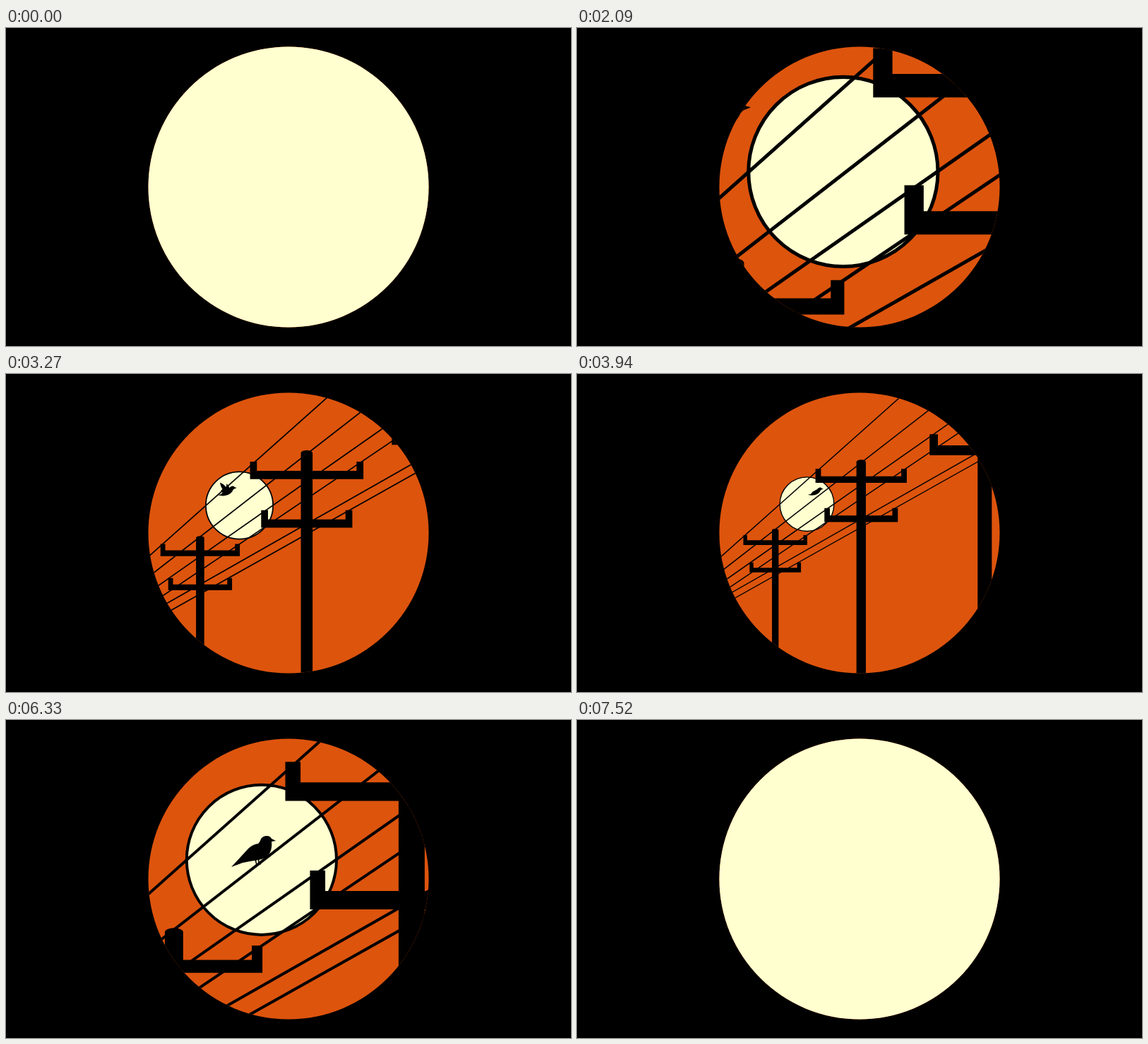
Write an HTML page with a canvas that moves like this. It is 800 by 450 pixels and loops after 7700 ms.

```html
<!DOCTYPE html>
<html lang="en">
<head>
<meta charset="utf-8">
<title>Bird on the wires</title>
<style>
  html, body { margin: 0; height: 100%; overflow: hidden; background: #000; }
  canvas { display: block; }
</style>
</head>
<body>
<canvas width="800" height="450"></canvas>
<script>
const ctx = document.querySelector('canvas').getContext('2d');
const LOOP = 7700, FOCUS = [305, 176.5];
const ORANGE = '#dd540d', CREAM = '#ffffcf';

// Scene units: screen pixels at zoom 1, measured from FOCUS.
const ZOOM = [[0, 1.9], [1850, 1.9], [2090, 1.281], [2760, .565], [3270, .244],
              [4210, 0], [5520, 0], [6330, 1.044], [7030, 1.9], [LOOP, 1.9]];
const FLY_X = [[1850, -34], [2090, -27.2], [2760, -8], [3270, 6.3], [4210, 36.3]];
const FLY_Y = [[1850, -17.5], [2090, -16.2], [2760, -13.5], [3270, -10.5], [4210, -12.3]];
const HOPS = [4520, 5000, 5520], HOP_TIME = 240;
const LEAVE = 6600, LEAVE_END = 7060, WIPE = 7080, WIPE_TIME = 230;

// Height at x = 0, slope, moment of appearing.
const WIRES = [[-7.8, -.89, 180], [23.9, -.776, 560], [47.4, -.7, 940],
               [63.8, -.674, 940], [81.7, -.568, 940], [92.4, -.561, 940]];

const clamp = v => Math.min(1, Math.max(0, v));
const smooth = v => v * v * (3 - 2 * v);

// Smooth curve through [time, value] keys, flat at turning points.
function track(keys, t) {
  const last = keys.length - 1;
  if (t <= keys[0][0]) return keys[0][1];
  if (t >= keys[last][0]) return keys[last][1];
  const i = keys.findIndex(k => k[0] > t) - 1;
  const rise = j => keys[j + 1][1] - keys[j][1];
  const slope = j => j < 1 || j >= last || rise(j - 1) * rise(j) <= 0 ? 0
    : (keys[j + 1][1] - keys[j - 1][1]) / (keys[j + 1][0] - keys[j - 1][0]);
  const span = keys[i + 1][0] - keys[i][0], u = (t - keys[i][0]) / span, v = 1 - u;
  return keys[i][1] + rise(i) * smooth(u)
    + span * u * v * (slope(i) * v - slope(i + 1) * u);
}

function disc(x, y, r, color) {
  ctx.fillStyle = color;
  ctx.beginPath();
  ctx.arc(x, y, r, 0, 7);
  ctx.fill();
}

function drawWires(t) {
  const out = clamp((t - WIPE) / WIPE_TIME);
  for (const [height, slope, start] of WIRES) {
    const grown = clamp((t - start) / 250);
    if (!grown || out === 1) continue;
    const from = out ? -16 + 60 * out : -120;
    const to = grown < 1 ? -16 + 60 * grown : 320;
    ctx.beginPath();
    ctx.moveTo(from, height + slope * from);
    ctx.lineTo(to, height + slope * to);
    ctx.stroke();
  }
}

function drawPole(x, top, scale) {
  ctx.save();
  ctx.translate(x, top);
  ctx.scale(scale, scale);
  ctx.beginPath();
  ctx.ellipse(0, 3, 6.5, 3, 0, 0, 7);
  ctx.rect(-6.5, 3, 13, 500);
  for (const [half, y] of [[62.9, 22.7], [50.6, 76.7]]) {
    ctx.rect(-half, y, 2 * half, 9.2);
    for (const side of [-half, half - 7.6]) ctx.rect(side, y - 10.2, 7.6, 12);
  }
  ctx.fill();
  ctx.restore();
}

const perched = new Path2D(`M-36 5Q-22-10-12-21Q-6-27 2-28Q5-31 6-35Q9-39 14-39
  Q19-39 21-35L27-32L21-31Q22-21 18-14Q12-6 2-5Q-10-3-20-1Z
  M-3-6h2l1 6h3v1.5h-4zM2-6h1.5l0 6h2.5v1.5h-4z`);
const body = new Path2D('M19-3L15-4Q13-7 9-6Q6-5 4-2L-7 4L-12 10L-19 11Q-10 14-2 12Q8 10 12 1L14-1Z');
const wings = new Path2D('M7 0Q2-2-1-3Q-7-11-14-13Q-12-4-9 0Q-13 3-12 5Q-6 8 0 7ZM6 1Q4-7-1-11Q-2-4-2 3Z');

function drawShape(x, y, scale, draw) {
  ctx.save();
  ctx.translate(x, y);
  ctx.scale(scale, scale);
  draw();
  ctx.restore();
}

function drawFlying(x, y, t) {
  drawShape(x, y, 1 / 1.76, () => {
    ctx.fill(body);
    ctx.translate(0, 3);
    ctx.scale(1, .4 + .6 * Math.cos((t - 2760) / 255 * 2 * Math.PI));
    ctx.translate(0, -3);
    ctx.fill(wings);
  });
}

function drawBird(t) {
  if (t < 1850 || t > LEAVE_END) return;
  if (t < 4210) return drawFlying(track(FLY_X, t), track(FLY_Y, t), t);
  if (t > LEAVE) {
    const u = (t - LEAVE) / (LEAVE_END - LEAVE);
    return drawFlying(16 + 44 * u * (.5 + .5 * u), 3.3 - 32 * u, t);
  }
  let x = 37.7, lift = 0;
  for (const start of HOPS) {
    const u = clamp((t - start) / HOP_TIME);
    x -= 6.7 * smooth(u);
    lift += 3 * Math.sin(Math.PI * u);
  }
  drawShape(x, 23 - .776 * x - lift, 1 / 2.84, () => ctx.fill(perched));
}

function render(t) {
  const zoom = Math.exp(track(ZOOM, t));
  ctx.setTransform(1, 0, 0, 1, 0, 0);
  ctx.fillStyle = '#000';
  ctx.fillRect(0, 0, 800, 450);
  ctx.save();
  disc(400, 225, 198.5, ORANGE);
  ctx.clip();
  ctx.translate(...FOCUS);
  ctx.scale(zoom, zoom);
  ctx.strokeStyle = '#000';
  ctx.lineWidth = 1.4;
  disc(20, 7.5, 37.3, CREAM);
  ctx.stroke();
  drawWires(t);
  ctx.fillStyle = '#000';
  drawBird(t);
  drawPole(-23.6, 41.4, .7);
  drawPole(94.7, -53.7, 1);
  drawPole(265, -188.6, 1.5);
  ctx.restore();
}

const begin = performance.now();
function tick() {
  render((performance.now() - begin) % LOOP);
  requestAnimationFrame(tick);
}
tick();
</script>
</body>
</html>
```
